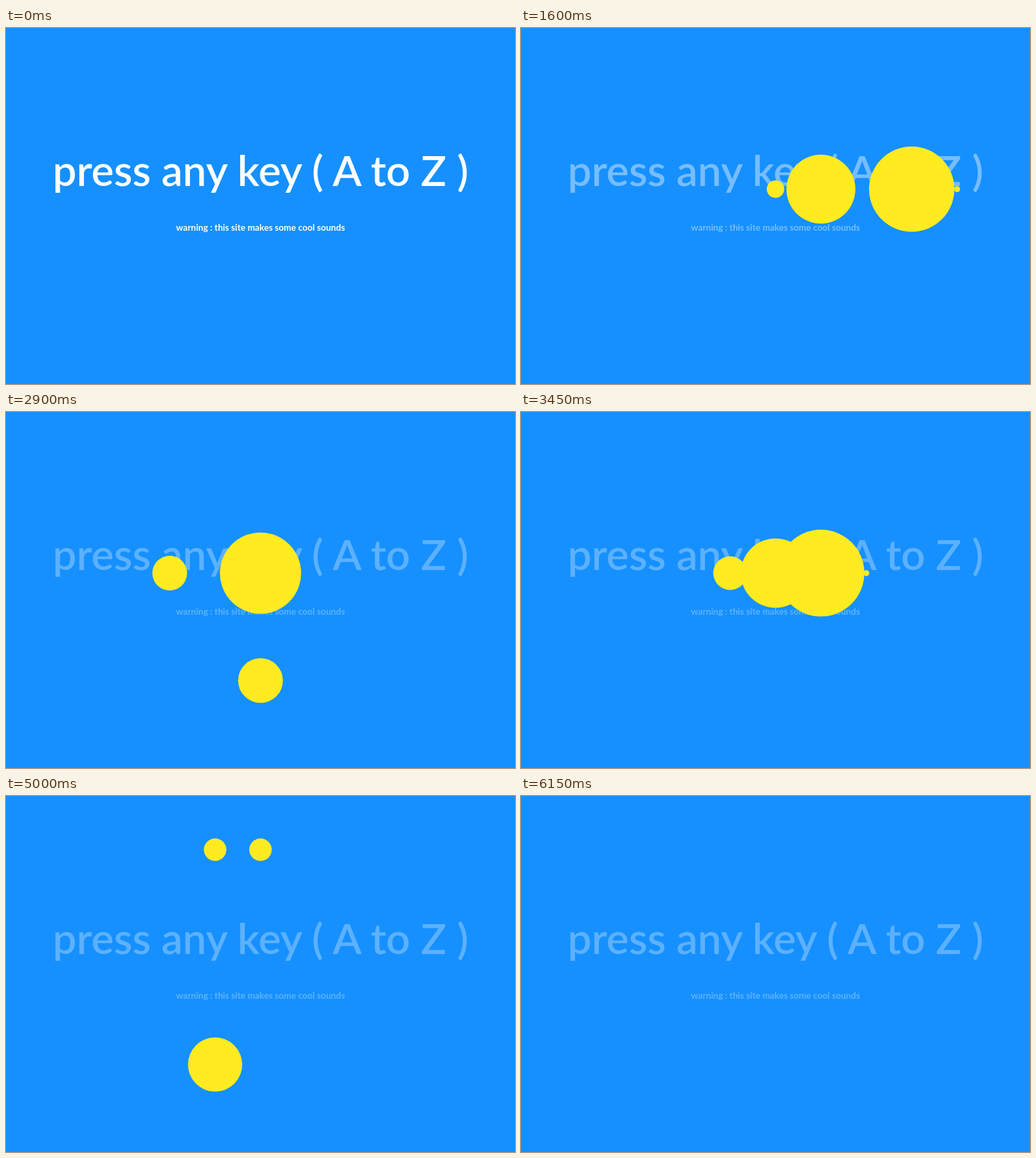
Recreate the animation shown at these times as an HTML page. Size 750 by 525 pixels, loop 6200 ms.

```html
<!DOCTYPE html>
<html lang="en">
<head>
<meta charset="utf-8">
<style>
  html, body { margin: 0; width: 100%; height: 100%; overflow: hidden; background: #1690ff; }
  svg { display: block; }
  text { font-family: Lato, sans-serif; font-weight: 700; fill: #fff; text-anchor: middle; }
  .title { font-size: 62.4px; font-weight: 600; }
  .note { font-size: 13.1px; }
</style>
</head>
<body>
<svg width="750" height="525" viewBox="0 0 750 525">
  <g id="words">
    <text class="title" x="375" y="233">press any key ( A to Z )</text>
    <text class="note" x="375" y="299">warning : this site makes some cool sounds</text>
  </g>
  <g id="dots" fill="#ffeb20"></g>
</svg>
<script>
const LOOP = 6200, GROW = 100, SHRINK = 250, RADIUS = 64;
const ROWS = ['qwertyuio', 'asdfghjkl', 'zxcvbnm'];

// Time of each key press in ms, and the keys pressed
const PRESSES = {
  90: 'f', 210: 'g', 330: 'h', 450: 'd', 560: 'j',
  720: 'k', 840: 'j', 960: 'f', 1070: 'd', 1216: 'ac',
  1325: 'g', 1426: 'h', 1480: 'k', 1584: 'l', 1690: 'r', 1760: 't', 1850: 'y',
  1960: 'b', 2010: 'v', 2200: 'x', 2330: 'z', 2420: 'c', 2540: 'f',
  2660: 'd', 2760: 'g', 2850: 'v', 2985: 'c', 3000: 'a', 3050: 's', 3095: 'd',
  3208: 'f', 3277: 'g', 3350: 'h', 3434: 'j', 3520: 'k', 3640: 'j', 3750: 'h', 3850: 'g', 3940: 'f',
  4055: 'k', 4200: 'j', 4274: 'h', 4340: 'g', 4400: 'd', 4440: 'a', 4465: 'r',
  4660: 'g', 4736: 'rt', 4796: 'c', 5050: 'g', 5140: 'h',
  5260: 'j', 5370: 'b', 5480: 'f', 5590: 'd', 5690: 'g', 5780: 'h'
};

const words = document.getElementById('words');
const layer = document.getElementById('dots');
const ease = x => (1 - Math.cos(Math.PI * x)) / 2;

function makeDot(start, key) {
  const row = ROWS.findIndex(keys => keys.includes(key));
  const col = ROWS[row].indexOf(key) - (ROWS[row].length - 1) / 2;
  const node = document.createElementNS('http://www.w3.org/2000/svg', 'circle');
  node.setAttribute('cx', 375 + col * 66.9);
  node.setAttribute('cy', 79.2 + row * 158.4);
  layer.append(node);
  return { start, node };
}

const dots = Object.entries(PRESSES).flatMap(([time, keys]) =>
  [...keys].map(key => makeDot(+time, key)));

function radiusAt(age) {
  if (age <= 0 || age >= GROW + SHRINK) return 0;
  return RADIUS * (age < GROW ? ease(age / GROW) : 1 - ease((age - GROW) / SHRINK));
}

function draw(t) {
  words.setAttribute('opacity', Math.max(0.3, 1 - 0.7 * t / 1900));
  for (const { start, node } of dots) node.setAttribute('r', radiusAt(t - start));
}

const begin = performance.now();
function tick() {
  draw((performance.now() - begin) % LOOP);
  requestAnimationFrame(tick);
}
draw(0);
tick();
</script>
</body>
</html>
```
